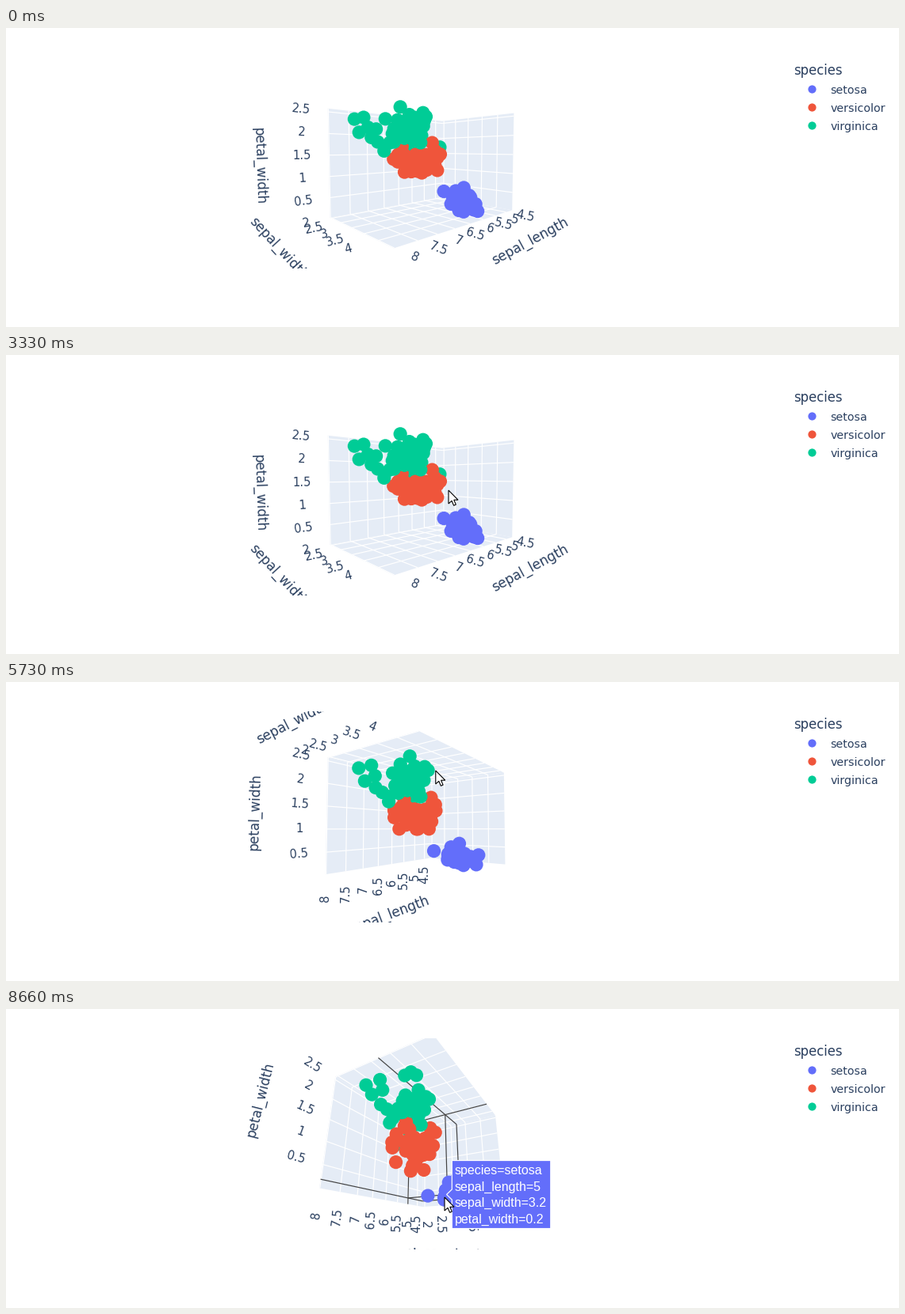
A matplotlib script that plays this animation: 1126 by 378 pixels, repeating every 8720 ms.

```python
import math

import matplotlib.pyplot as plt
import numpy as np
from matplotlib.animation import FuncAnimation
from matplotlib.collections import LineCollection, PolyCollection
from matplotlib.patches import Polygon

W, H, LOOP, STEP = 1126, 378, 8720, 40
PT = 0.72                                   # points per pixel at 100 dpi
TOP, BOTTOM = 37, 304                       # scene viewport
CX, CY, FOCAL, DIST = 530, 170.5, 322.3, 2.165
INK, PLANE, SPIKE = "#2a3f5f", "#e5ecf6", "#444444"

NAMES = ["sepal_length", "sepal_width", "petal_width"]
LO = np.array([4.1875, 1.925, 0.025])
HI = np.array([8.0125, 4.475, 2.575])
MID, SCALE = (LO + HI) / 2, 0.3426
TICKS = [np.arange(4.5, 8.1, 0.5), np.arange(2, 4.1, 0.5), np.arange(0.5, 2.6, 0.5)]
TICK_PAD, TITLE_PAD = [0.175, 0.19, 0.2], 0.47

# colour, mean, spread, length/width correlation, outlying flowers
SPECIES = {
    "setosa": ("#636efa", (5.0, 3.42, 0.24), (0.3, 0.3, 0.07), 0.75, [
        (5.7, 4.4, 0.4), (5.8, 4.0, 0.2), (5.5, 4.2, 0.2), (5.2, 4.1, 0.1),
        (4.5, 2.3, 0.3), (4.3, 3.0, 0.1), (5.0, 3.5, 0.6), (5.1, 3.3, 0.5),
        (4.4, 2.9, 0.2), (5.4, 3.4, 0.2), (5.0, 3.2, 0.2), (4.8, 3.0, 0.1)]),
    "versicolor": ("#ef553b", (5.9, 2.8, 1.33), (0.36, 0.2, 0.12), 0.5, [
        (7.0, 3.2, 1.4), (6.9, 3.1, 1.5), (6.8, 2.8, 1.4), (6.7, 3.0, 1.7),
        (6.7, 3.1, 1.5), (6.3, 2.3, 1.3), (6.2, 2.2, 1.5), (6.0, 3.4, 1.6),
        (5.9, 3.2, 1.8), (6.0, 2.2, 1.0), (5.0, 2.0, 1.0), (4.9, 2.4, 1.0),
        (5.4, 3.0, 1.5), (5.2, 2.7, 1.4), (5.5, 2.4, 1.0), (5.8, 2.7, 1.0),
        (6.1, 3.0, 1.4), (5.6, 3.0, 1.5)]),
    "virginica": ("#00cc96", (6.42, 2.98, 2.05), (0.34, 0.2, 0.2), 0.4, [
        (7.9, 3.8, 2.0), (7.7, 3.8, 2.2), (7.7, 2.6, 2.3), (7.7, 2.8, 2.0),
        (7.7, 3.0, 2.3), (7.6, 3.0, 2.1), (7.4, 2.8, 1.9), (7.3, 2.9, 1.8),
        (7.2, 3.6, 2.5), (7.2, 3.0, 1.6), (4.9, 2.5, 1.7), (6.0, 2.2, 1.5),
        (6.3, 3.4, 2.4), (6.9, 3.1, 2.3), (5.8, 2.8, 2.4), (6.7, 2.5, 1.8),
        (6.3, 3.3, 2.5)]),
}

# start, end, species, flower under the pointer
HOVERS = [
    (930, 1200, "virginica", (6.9, 3.1, 2.3)),
    (1200, 2080, "versicolor", (6.7, 3.1, 1.5)),
    (2080, 3040, "versicolor", (6.1, 3.0, 1.4)),
    (6360, 7240, "virginica", (6.3, 3.4, 2.4)),
    (7240, 8000, "versicolor", (5.6, 3.0, 1.5)),
    (8000, LOOP, "setosa", (5.0, 3.2, 0.2)),
]
# time, azimuth, elevation
CAMERA = np.array([(5000, 47, 3), (5730, 36.7, -2.7), (6300, 30.8, -20)])
# time, x, y
POINTER = np.array([
    (930, 486, 114), (1200, 480, 135), (1700, 480, 135), (2100, 526, 181),
    (2960, 526, 181), (3300, 558, 171), (4600, 558, 171), (4960, 524, 190),
    (5730, 542, 111), (5960, 542, 102), (6900, 542, 102), (7860, 553, 238)])
ARROW = np.array([(0, 0), (0, 17), (4, 13.3), (6.6, 19.3), (9.3, 18.1),
                  (6.8, 12.2), (12, 12.2)])


def track(keys, t):
    return [np.interp(t, keys[:, 0], column) for column in keys.T[1:]]


def flowers():
    rng = np.random.default_rng(4)
    points, colors = [], []
    for color, mean, spread, rho, outer in SPECIES.values():
        n = 50 - len(outer)
        a, b, c = np.clip(rng.normal(size=(3, n)), -1.6, 1.6)
        cloud = np.array([a, rho * a + math.sqrt(1 - rho ** 2) * b, c]).T
        points += [np.round(mean + cloud * spread, 1), outer]
        colors += [color] * 50
    return np.vstack(points), np.array(colors)


def project(points, pose):
    """Pixel positions and depths of data points for a turntable camera."""
    az, el = np.radians(pose)
    x, y, z = ((np.asarray(points, float) - MID) * SCALE).T
    toward = x * math.cos(az) + y * math.sin(az)
    depth = DIST - toward * math.cos(el) - z * math.sin(el)
    right = y * math.cos(az) - x * math.sin(az)
    up = z * math.cos(el) - toward * math.sin(el)
    return np.array([CX + FOCAL * right / depth, CY - FOCAL * up / depth]).T, depth


def segments(pairs, pose):
    flat, _ = project(np.reshape(pairs, (-1, 3)), pose)
    return flat.reshape(-1, 2, 2)


def span(base, axis):
    """A line across the whole box along one axis."""
    a, b = np.array(base, float), np.array(base, float)
    a[axis], b[axis] = LO[axis], HI[axis]
    return a, b


def faces(el):
    return np.array([LO[0], LO[1], LO[2] if el > 0 else HI[2]])


def planes_and_grid(el):
    quads, lines = [], []
    for axis, value in enumerate(faces(el)):
        u, v = (axis + 1) % 3, (axis + 2) % 3
        base = LO.copy()
        base[axis] = value
        near, far = span(base, u)
        quads.append([near, far, span(far, v)[1], span(near, v)[1]])
        for s, r in ((u, v), (v, u)):
            for tick in TICKS[s]:
                start = base.copy()
                start[s] = tick
                lines.append(span(start, r))
    return quads, lines


def spike_lines(point, el):
    wall, lines = faces(el), []
    for axis in range(3):
        foot = np.array(point, float)
        foot[axis] = wall[axis]
        lines.append((np.array(point, float), foot))
        lines += [span(foot, other) for other in range(3) if other != axis]
    return lines


def axis_layout(axis, el):
    """Box edge carrying the labels of an axis, and its outward direction."""
    base = np.array([HI[0], LO[1], LO[2]])
    out = np.array([1.0, 0, 0])
    if axis == 0 and el > 0:
        base[1], out = HI[1], np.array([0, 1.0, 0])
    elif axis == 0 or (axis == 1 and el < -8):
        base, out = LO.copy(), np.array([0, 0, -1.0])
    elif axis == 1 and el <= 0:
        base[2] = HI[2]
    return base, out / SCALE


def angle(d):
    return math.degrees(math.atan2(-d[1], d[0]))


def screen_dir(point, step, pose):
    a, b = project([point, point + step], pose)[0]
    return b - a


fig = plt.figure(figsize=(W / 100, H / 100), dpi=100, facecolor="white")


def layer(top, bottom):
    ax = fig.add_axes([0, 1 - bottom / H, 1, (bottom - top) / H])
    ax.set_xlim(0, W)
    ax.set_ylim(bottom, top)
    ax.axis("off")
    return ax


scene, overlay = layer(TOP, BOTTOM), layer(0, H)


def label(text, size):
    return scene.text(0, 0, text, size=size * PT, color=INK, family="DejaVu Sans",
                      ha="center", va="center", clip_on=True, zorder=4)


plane_art = scene.add_collection(PolyCollection([], facecolors=PLANE, linewidths=0, zorder=0))
grid_art = scene.add_collection(LineCollection([], colors="white", linewidths=1.2 * PT, zorder=1))
spike_art = scene.add_collection(LineCollection([], colors=SPIKE, linewidths=1.2 * PT, zorder=2))
POINTS, COLORS = flowers()
dots = scene.scatter(*POINTS[:, :2].T, s=(17.2 * PT) ** 2, c=COLORS, linewidths=0, zorder=3)
tick_art = [[label(f"{v:g}", 14.8) for v in ticks] for ticks in TICKS]
title_art = [label(name, 16.9) for name in NAMES]

overlay.text(993, 59, "species", size=16.5 * PT, color=INK, family="DejaVu Sans")
for row, (name, style) in enumerate(SPECIES.items()):
    y = 77 + 23 * row
    overlay.scatter(1015.5, y, s=(10.2 * PT) ** 2, c=style[0], linewidths=0)
    overlay.text(1039.5, y + 5.7, name, size=14.2 * PT, color=INK, family="DejaVu Sans")

bubble = overlay.add_patch(Polygon([(0, 0), (1, 1), (1, 0)], lw=1.2 * PT, zorder=5))
bubble_text = [overlay.text(0, 0, "", size=16 * PT, family="Liberation Sans", zorder=6)
               for _ in range(4)]
pointer = overlay.add_patch(Polygon(ARROW, fc="white", ec="black", lw=1.1 * PT, zorder=7))


def draw_labels(pose):
    el = pose[1]
    for axis in range(3):
        base, out = axis_layout(axis, el)
        centre = base.copy()
        centre[axis] = MID[axis]
        sign = -1 if screen_dir(centre, out * 0.05, pose)[0] < 0 else 1
        for value, art in zip(TICKS[axis], tick_art[axis]):
            edge = base.copy()
            edge[axis] = value
            art.set_position(project([edge + out * TICK_PAD[axis]], pose)[0][0])
            art.set_rotation(angle(sign * screen_dir(edge, out * 0.05, pose)))
        spot = centre + out * TITLE_PAD
        along = screen_dir(spot, np.eye(3)[axis] * 0.05, pose)
        title_art[axis].set_position(project([spot], pose)[0][0])
        title_art[axis].set_rotation(angle(along if along[0] >= 0 else -along))


def draw_scene(pose):
    quads, lines = planes_and_grid(pose[1])
    plane_art.set_verts([project(q, pose)[0] for q in quads])
    grid_art.set_segments(segments(lines, pose))
    spots, depth = project(POINTS, pose)
    order = np.argsort(-depth)
    dots.set_offsets(spots[order])
    dots.set_facecolors(COLORS[order])
    draw_labels(pose)


def draw_hover(t, pose):
    hover = next((h for h in HOVERS if h[0] <= t < h[1]), None)
    for art in [bubble, spike_art, *bubble_text]:
        art.set_visible(hover is not None)
    if hover is None:
        return
    _, _, name, point = hover
    spike_art.set_segments(segments(spike_lines(point, pose[1]), pose))
    x, y = project([point], pose)[0][0]
    ink = "white" if name == "setosa" else SPIKE
    rows = [f"species={name}"] + [f"{n}={v:g}" for n, v in zip(NAMES, point)]
    for i, (art, row) in enumerate(zip(bubble_text, rows)):
        art.set(text=row, color=ink, position=(x + 9.5, y - 25.5 + 20.5 * i))
    width = max(art.get_window_extent().width for art in bubble_text) + 8.5
    left, right = x + 5.7, x + 5.7 + width
    bubble.set(facecolor=SPECIES[name][0], edgecolor=ink)
    bubble.set_xy([(x - 1, y), (left, y - 6.5), (left, y - 43), (right, y - 43),
                   (right, y + 43), (left, y + 43), (left, y + 6.5)])


shown = {"pose": None}


def update(frame):
    t = frame * STEP
    pose = track(CAMERA, t)
    if pose != shown["pose"]:
        draw_scene(pose)
        shown["pose"] = pose
    draw_hover(t, pose)
    pointer.set_visible(t >= POINTER[0, 0])
    pointer.set_xy(ARROW + track(POINTER, t))
    return []


anim = FuncAnimation(fig, update, frames=LOOP // STEP, interval=STEP,
                     repeat=True, repeat_delay=0, blit=False)
plt.show()
```
